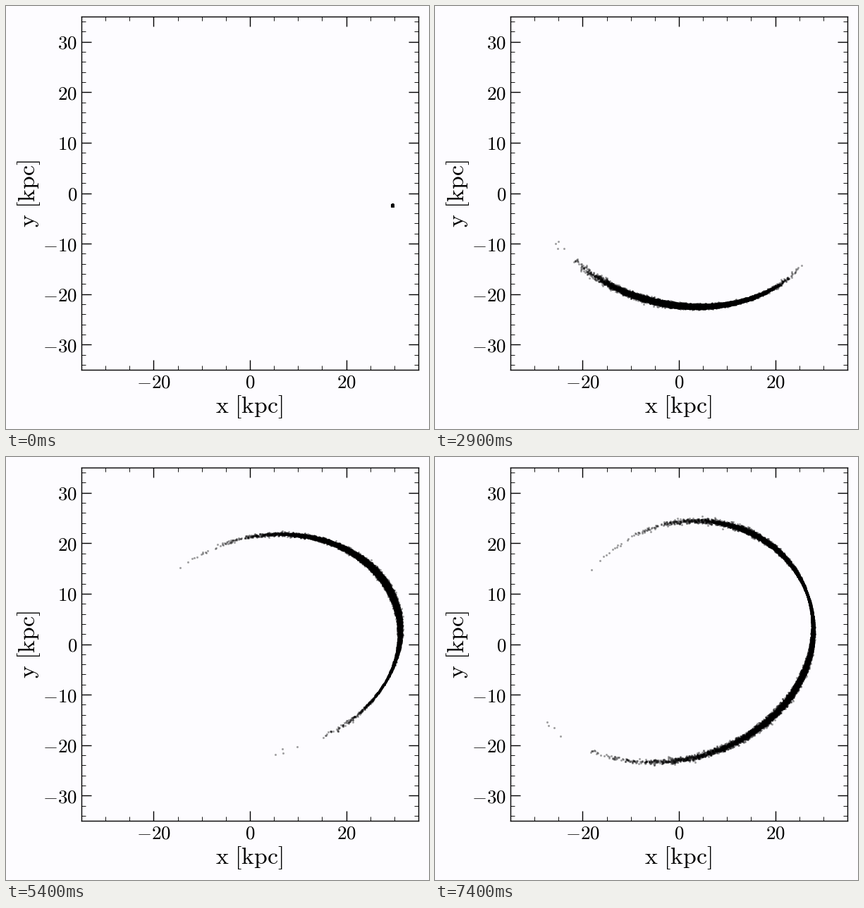
Write a matplotlib script that moves like this. It is 600 px wide and 600 px high and loops after 7500 ms.

```python
import matplotlib.pyplot as plt
import numpy as np
from matplotlib.animation import FuncAnimation
from matplotlib.ticker import FuncFormatter, MultipleLocator

SIZE, DPI = 600, 100
FRAMES, INTERVAL = 75, 100
STARS, SUBSTEPS = 20000, 12
FRAME_TIME = 17.32              # kpc per unit circular speed
R0, SLOPE = 29, 0.02            # speed squared falls as (r / R0) ** -SLOPE
SPREAD_X = 0.05
SPREAD_V = np.array([[0.0145], [0.0145], [0.009]])
COS_I, SIN_I = 0.8, 0.6         # tilt of the orbital plane about the x axis
BACKGROUND = "#fdfcff"

plt.rcParams.update({"mathtext.fontset": "cm", "axes.unicode_minus": True})


def accel(pos):
    """Halo with a nearly flat rotation curve of speed 1."""
    r2 = (pos * pos).sum(axis=0)
    return -pos * (R0 * R0 / r2) ** (SLOPE / 2) / r2


def stream():
    """Sky positions of all stars at every frame."""
    rng = np.random.default_rng(8)
    start = np.array([29.6, -2.4 / COS_I, 0.0])
    radial = start / np.linalg.norm(start)
    tangent = np.array([-radial[1], radial[0], 0.0])
    bulk = 0.138 * radial + 0.9617 * tangent
    pos = start[:, None] + SPREAD_X * rng.standard_normal((3, STARS))
    vel = bulk[:, None] + SPREAD_V * rng.standard_normal((3, STARS))

    n = np.arange(FRAMES)
    times = FRAME_TIME * (n + 0.33 * np.sin(2 * np.pi * n / 76))

    def project():
        return pos[0].copy(), COS_I * pos[1] + SIN_I * pos[2]

    frames = [project()]
    for span in np.diff(times):
        h = span / SUBSTEPS
        pos += 0.5 * h * vel
        for step in range(SUBSTEPS):
            vel += h * accel(pos)
            pos += (h if step < SUBSTEPS - 1 else 0.5 * h) * vel
        frames.append(project())
    return frames


def px(length):
    return length * 72 / DPI


def tick_label(value, _):
    return f"${value:.0f}$"


fig = plt.figure(figsize=(SIZE / DPI, SIZE / DPI), dpi=DPI,
                 facecolor=BACKGROUND)
ax = fig.add_axes([107 / SIZE, 1 - 516 / SIZE, 478 / SIZE, 501 / SIZE],
                  facecolor=BACKGROUND)
ax.set(xlim=(-35, 35), ylim=(-35, 35))

for axis, major, minor in ((ax.xaxis, 20, 5), (ax.yaxis, 10, 2)):
    axis.set_major_locator(MultipleLocator(major))
    axis.set_minor_locator(MultipleLocator(minor))
    axis.set_major_formatter(FuncFormatter(tick_label))
ax.tick_params(which="both", direction="in", top=True, right=True)
ax.tick_params(which="major", length=px(14), width=px(1.4), pad=px(6),
               labelsize=19.5)
ax.tick_params(which="minor", length=px(6), width=px(0.9))
for spine in ax.spines.values():
    spine.set_linewidth(px(1.4))

label = dict(fontsize=24.3, ha="center", va="baseline")
fig.text(345 / SIZE, 1 - 577 / SIZE, r"$\mathrm{x\ [kpc]}$", **label)
fig.text(41 / SIZE, 1 - 266 / SIZE, r"$\mathrm{y\ [kpc]}$", rotation=90,
         rotation_mode="anchor", **label)

dots, = ax.plot([], [], "o", color="black", ms=px(3), mew=0, alpha=0.37,
                snap=False)
positions = stream()


def draw(frame):
    dots.set_data(*positions[frame])
    return dots,


anim = FuncAnimation(fig, draw, frames=FRAMES, interval=INTERVAL,
                     repeat=True, repeat_delay=0)
plt.show()
```
